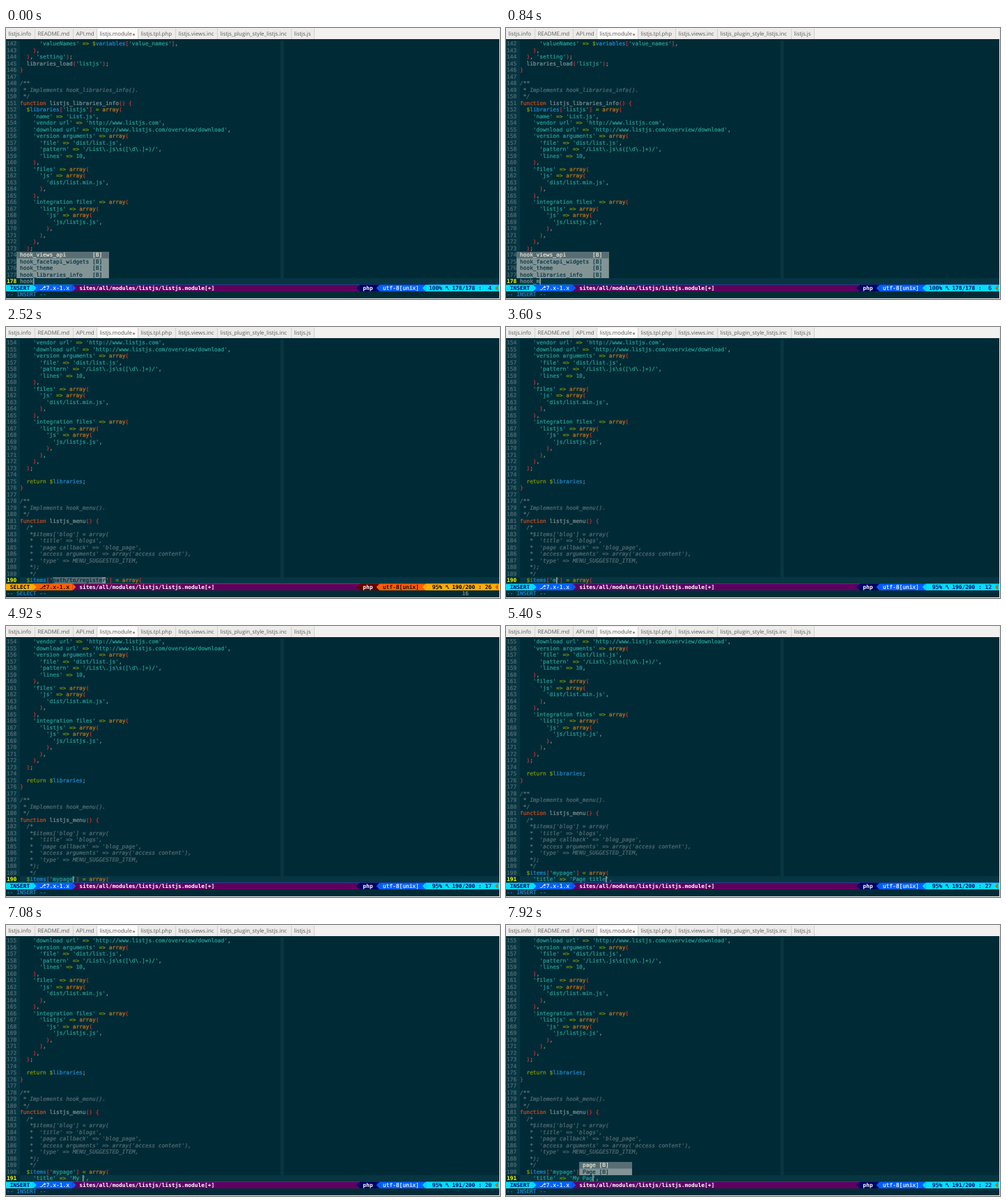
Recreate the animation shown at these times as an HTML page. Size 709 px wide and 390 px high, loop 8 s.

```html
<!DOCTYPE html>
<html lang="en">
<head>
<meta charset="utf-8">
<title>Editor session</title>
<style>
  html, body { margin: 0; width: 100%; height: 100%; overflow: hidden; background: #002b36; }
  #stage {
    position: relative; width: 709px; height: 390px; overflow: hidden;
    background: #002b36; color: #839496; text-rendering: geometricPrecision;
    --a: #00dfff; --a-ink: #00005f; --b: #005fff; --b-ink: #fff; --c: #5f005f; --x: #00005f;
  }
  #stage.select { --a: #ffaf00; --a-ink: #000; --b: #ff5f00; --b-ink: #000; --x: #5f0000; }
  #stage::after {
    content: ""; position: absolute; inset: 0; border: solid #eceae8; border-width: 0 1px 1px 0;
  }

  #tabs { position: absolute; inset: 0 0 auto; height: 16px; background: #f2f1f0; }
  #tabs span {
    position: absolute; top: 1px; height: 15px; box-sizing: border-box; padding-left: 3.4px;
    border-right: 1px solid #d3d0cc; background: #ecebe9; color: #5c5c5c;
    font: 7.9px/16px "Open Sans", "Noto Sans", sans-serif; white-space: nowrap;
  }
  #tabs .active { background: #fbfaf9; }
  #tabs .active::after {
    content: ""; position: absolute; left: 51px; top: 7px; width: 3px; height: 3px;
    border-radius: 50%; background: #b5756a;
  }

  /* Laid out in whole 9 x 18 cells, then scaled down to the stage. */
  #screen {
    position: absolute; left: 1.15px; top: 17.75px;
    transform-origin: 0 0; transform: scale(.5261, .5278);
  }
  pre, .fill { position: absolute; margin: 0; height: 18px; }
  pre {
    font: 14.95px/18px "DejaVu Sans Mono", "DejaVu Sans", monospace; white-space: pre;
    -webkit-text-stroke: .4px currentColor;
  }
  .right { clip-path: polygon(0 0, 100% 50%, 0 100%); }
  .left { clip-path: polygon(100% 0, 0 50%, 100% 100%); }

  .num, .comment { color: #586e75; }
  .comment { font-style: italic; }
  .str { color: #2aa198; }
  .op { color: #859900; }
  .var, .mode { color: #268bd2; }
  .type { color: #c9781a; }
  .def { color: #dc4b1c; }
  .delim { color: #dc322f; }
  .menu { color: #073642; }
  .menu.first { color: #eee8d5; }
  .picked { background: #586e75; color: #002b36; }
  .block { background: #839496; color: #002b36; }
  .ink-a { color: var(--a-ink); }
  .ink-b { color: var(--b-ink); }
  .ink-c { color: #fff; }
  .now { color: #ff0; }
  .now, .bold { font-weight: bold; -webkit-text-stroke: 0; }
</style>
</head>
<body>
<div id="stage">
  <div id="tabs"></div>
  <div id="screen"></div>
</div>
<script>
const LOOP = 8000;
const CELL = 9, ROW = 18, COLS = 150;
const GUTTER = 4, LAST = 36, STATUS = 37, COMMAND = 38;
const FIRST_LINE = 142;

const code = String.raw`      'valueNames' => $variables['value_names'],
    ),
  ), 'setting');
  libraries_load('listjs');
}

/**
 * Implements hook_libraries_info().
 */
function listjs_libraries_info() {
  $libraries['listjs'] = array(
    'name' => 'List.js',
    'vendor url' => 'http://www.listjs.com',
    'download url' => 'http://www.listjs.com/overview/download',
    'version arguments' => array(
      'file' => 'dist/list.js',
      'pattern' => '/List\.js\s([\d\.]+)/',
      'lines' => 10,
    ),
    'files' => array(
      'js' => array(
        'dist/list.min.js',
      ),
    ),
    'integration files' => array(
      'listjs' => array(
        'js' => array(
          'js/listjs.js',
        ),
      ),
    ),
  );

  return $libraries;
}

/**
 * Implements hook_menu().
 */
function listjs_menu() {
  /*
   *$items['blog'] = array(
   *  'title' => 'blogs',
   *  'page callback' => 'blog_page',
   *  'access arguments' => array('access content'),
   *  'type' => MENU_SUGGESTED_ITEM,
   *);
   */
  $items['mypage'] = array(`.split('\n');

// Each view ends with the line being edited: before + typed text + after.
const views = [
  { line: 178, total: 178, percent: '100%', before: '', after: '' },
  { line: 190, total: 200, percent: '95%', before: "  $items['", after: "'] = array(" },
  { line: 191, total: 200, percent: '95%', before: "    'title' => '", after: "'," },
];

const hooks = ['hook_views_api', 'hook_facetapi_widgets', 'hook_theme', 'hook_libraries_info'];
const theme = ['hook_theme'];
const pages = ['page', 'Page'];
const words = [...pages, 'path', 'pattern', 'params', 'options_validate'];

// time, view, typed text, options (lag: status column trails the cursor)
const steps = [
  [0, 0, 'hook', { lag: 1, menu: hooks }],
  [480, 0, 'hook_', { lag: 1, menu: hooks }],
  [840, 0, 'hook_m', { lag: 1, menu: hooks }],
  [960, 0, 'hook_m', { menu: theme }],
  [1320, 0, 'hook_me', { lag: 1, menu: theme }],
  [1560, 0, 'hook_men'],
  [1680, 0, 'hook_menu'],
  [2400, 1, 'path/to/register'],
  [2520, 1, 'path/to/register', { select: true, block: true }],
  [3120, 1, 'path/to/register', { select: true }],
  [3360, 1, 'path/to/register', { select: true, block: true }],
  [3600, 1, 'm'],
  [3840, 1, 'my'],
  [4320, 1, 'myp'],
  [4560, 1, 'mypa'],
  [4680, 1, 'mypag'],
  [4920, 1, 'mypage'],
  [5400, 2, 'Page title'],
  [5520, 2, 'Page title', { select: true, block: true }],
  [6120, 2, 'Page title', { select: true }],
  [6360, 2, 'Page title', { select: true, block: true }],
  [6720, 2, 'M'],
  [6840, 2, 'My', { lag: 1, menu: ['mypage'] }],
  [7080, 2, 'My '],
  [7560, 2, 'My P'],
  [7680, 2, 'My Pa', { menu: words }],
  [7920, 2, 'My Pag', { lag: 1, menu: pages }],
];

const span = (cls, str) => `<span class="${cls}">${str}</span>`;
const text = (row, col, str, cls = '') =>
  `<pre class="${cls}" style="left:${col * CELL}px;top:${row * ROW}px">${str}</pre>`;
const fill = (row, col, rows, cols, color, cls = '') =>
  `<div class="fill ${cls}" style="left:${col * CELL}px;top:${row * ROW}px;` +
  `width:${cols * CELL}px;height:${rows * ROW}px;background:${color}"></div>`;

const token = /('[^']*')|(\$)(\w+)|\b(array)\b|\b(function)\b|\b(return)\b|\b(\d+)\b|(=>?)|([()[\]{}])/g;
function highlight(line) {
  if (/^\s*(\/\*|\*)/.test(line)) return span('comment', line);
  return line.replace(token, (all, str, dollar, name, type, def, ret, num, op) => {
    if (dollar) return span('op', dollar) + span('var', name);
    const cls = str || num ? 'str' : type ? 'type' : def ? 'def' : ret || op ? 'op' : 'delim';
    return span(cls, all);
  });
}

function drawCode(view, typed) {
  const start = view.line - LAST;
  let out = fill(0, -1, LAST, GUTTER + 1, '#073642')
    + fill(LAST, GUTTER, 1, COLS, '#073642')
    + fill(0, GUTTER + 79, LAST, 1, '#073642');
  for (let row = 0; row < LAST; row++) {
    out += text(row, 0, start + row, 'num')
      + text(row, GUTTER, highlight(code[start + row - FIRST_LINE]));
  }
  return out + text(LAST, 0, view.line, 'now')
    + text(LAST, GUTTER, highlight(view.before + typed + view.after));
}

function drawCursor(col, typed, { select, block }) {
  if (!select) return fill(LAST, col, 1, .28, '#93a1a1');
  const picked = text(LAST, col - typed.length, typed, 'picked');
  return block ? picked + text(LAST, col - 1, typed.slice(-1), 'block') : picked;
}

function drawMenu(col, typed, items) {
  const longest = Math.max(...items.map(item => item.length));
  const width = Math.max(16, longest + 7);
  const left = col - typed.match(/\w*$/)[0].length - 1;
  const top = LAST - items.length;
  const labels = items.map((item, i) =>
    text(top + i, left + 1, item.padEnd(longest + 1) + '[B]', i ? 'menu' : 'menu first'));
  return fill(top, left, items.length, width, '#839496')
    + fill(top, left, 1, width, '#586e75') + labels.join('');
}

function drawStatus(view, mode, pos) {
  // Each segment runs to the right edge; the next one covers its tail.
  const bar = (col, color) => fill(STATUS, col, 1, COLS - col, color);
  const arrow = (col, color, dir) => fill(STATUS, col, 1, 1, color, dir);
  const put = (col, str, cls) => text(STATUS, col, str, cls);
  return bar(-1, 'var(--a)') + bar(8, 'var(--b)') + bar(20, 'var(--c)')
    + bar(107, 'var(--x)') + bar(113, 'var(--b)') + bar(127, 'var(--a)')
    + arrow(8, 'var(--a)', 'right') + arrow(20, 'var(--b)', 'right')
    + arrow(106, 'var(--x)', 'left') + arrow(112, 'var(--b)', 'left')
    + arrow(126, 'var(--a)', 'left') + arrow(148, '#df5f00', 'left')
    + put(1, mode, 'ink-a bold')
    + put(10, '⎇', 'ink-b') + put(12, '7.x-1.x', 'ink-b')
    + put(22, 'sites/all/modules/listjs/listjs.module[+]', 'ink-c bold')
    + put(108, 'php', 'ink-c bold') + put(114, 'utf-8[unix]', 'ink-b')
    + put(128, view.percent.padStart(4), 'ink-a') + put(133, '␤', 'ink-a')
    + put(135, `${view.line}/${view.total}`, 'ink-a bold')
    + put(143, ':' + String(pos).padStart(3), 'ink-a');
}

const stage = document.getElementById('stage');
const screen = document.getElementById('screen');

function render([, viewIndex, typed, options = {}]) {
  const view = views[viewIndex];
  const { select, menu, lag = 0 } = options;
  const mode = select ? 'SELECT' : 'INSERT';
  const end = view.before.length + typed.length;
  const col = GUTTER + end;
  stage.className = mode.toLowerCase();
  screen.innerHTML = drawCode(view, typed)
    + drawCursor(col, typed, options)
    + (menu ? drawMenu(col, typed, menu) : '')
    + drawStatus(view, mode, select ? end : end + 1 - lag)
    + text(COMMAND, 0, `-- ${mode} --`, 'mode')
    + (select ? text(COMMAND, 138, typed.length) : '');
}

const tabs = [
  ['listjs.info', 0], ['README.md', 42], ['API.md', 97], ['listjs.module', 131],
  ['listjs.tpl.php', 190], ['listjs.views.inc', 244],
  ['listjs_plugin_style_listjs.inc', 304], ['listjs.js', 410],
];
document.getElementById('tabs').innerHTML = tabs.map(([name, left], i) => {
  const right = i + 1 < tabs.length ? tabs[i + 1][1] : 443;
  const cls = name === 'listjs.module' ? 'active' : '';
  return `<span class="${cls}" style="left:${left}px;width:${right - left}px">${name}</span>`;
}).join('');

let shown;
const origin = performance.now();
function tick() {
  const time = (performance.now() - origin) % LOOP;
  const step = steps.findLast(([start]) => start <= time);
  if (step !== shown) render(shown = step);
  requestAnimationFrame(tick);
}
tick();
</script>
</body>
</html>
```
